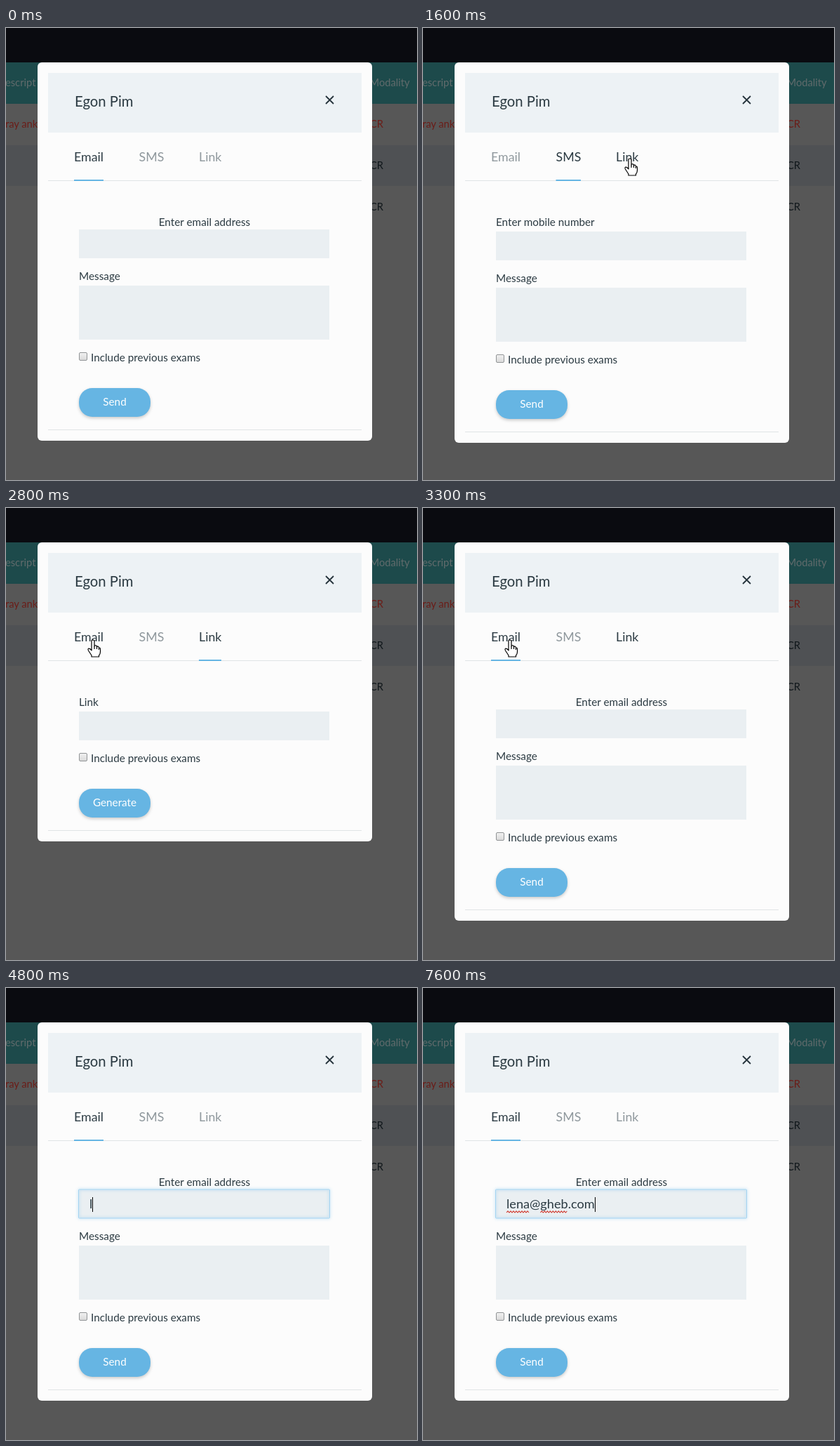
Write an HTML page that moves like this. It is 586 px wide and 644 px high and loops after 8 s.

```html
<!DOCTYPE html>
<html lang="en">
<head>
<meta charset="utf-8">
<title>Share dialog</title>
<style>
  html, body { margin: 0; width: 100%; height: 100%; overflow: hidden; background: #575757; }
  svg { display: block; width: 100%; height: 100%; font: 15.3px Lato, sans-serif; fill: #2b3a42; }
  text { white-space: pre; }
  .field { fill: #eaeff2; }
  .rule { fill: #e0e4e6; }
  .accent { fill: #66b5e3; }
  .button { filter: drop-shadow(0 2px 2px rgba(0, 0, 0, .2)); }
  .focus { fill: none; stroke: #a3d4f1; filter: drop-shadow(0 0 2px #7cc3ee); }
  .squiggle { fill: none; stroke: #d0392e; stroke-width: 1.1; }
  .cursor { fill: #fff; stroke: #000; stroke-width: 1.2; stroke-linejoin: round; }
</style>
</head>
<body>
<svg viewBox="0 0 586 644" xmlns="http://www.w3.org/2000/svg">
  <defs>
    <linearGradient id="box" x2="0" y2="1">
      <stop stop-color="#f1f1f1"/><stop offset="1" stop-color="#d9d9d9"/>
    </linearGradient>
  </defs>

  <rect width="586" height="644" fill="#575757"/>
  <rect width="586" height="49" fill="#0a0b10"/>
  <rect y="49" width="586" height="59" fill="#1d4a4b"/>
  <rect y="167" width="586" height="58" fill="#4f5154"/>
  <g font-size="14.7">
    <g fill="#616b6c"><text x="-1" y="83">escript</text><text x="518.5" y="83">Modality</text></g>
    <g fill="#6b1d18"><text x="-1" y="142">ray ank</text><text x="519" y="142">CR</text></g>
    <g fill="#11181c"><text x="519" y="201">CR</text><text x="519" y="260">CR</text></g>
  </g>

  <rect id="panel" x="45" y="49" width="477" rx="6" fill="#fcfcfc"/>
  <rect x="60" y="64" width="447" height="85" fill="#edf2f5"/>
  <text x="98" y="112" font-size="20.3">Egon Pim</text>
  <path d="M456 97l11 11m0-11l-11 11" stroke="#26343c" stroke-width="1.8"/>
  <g id="tabs" font-size="17.8"></g>
  <rect class="rule" x="60" y="217" width="447" height="1"/>
  <rect id="marker" class="accent" y="216" height="2"/>

  <text id="label" y="282"></text>
  <rect id="input" class="field" x="104" width="357" height="41"/>
  <rect id="focus" class="focus" x="103.5" y="287" width="358" height="41" rx="1"/>
  <g id="message">
    <text x="104" y="359">Message</text>
    <rect class="field" x="104" y="367" width="357" height="77"/>
  </g>
  <g id="footer">
    <rect x="104.5" y="462.5" width="11" height="11" rx="1.5" fill="url(#box)" stroke="#919496"/>
    <text x="121" y="475">Include previous exams</text>
    <rect class="accent button" x="104" y="513" width="102" height="41" rx="19"/>
    <text id="action" x="155" y="538" text-anchor="middle" fill="#fff"></text>
    <rect class="rule" x="60" y="572" width="447" height="1"/>
  </g>

  <text id="typed" x="119" y="314" font-size="18.2"></text>
  <path id="wave1" class="squiggle"/>
  <path id="wave2" class="squiggle"/>
  <rect id="caret" y="298" width="1" height="21" fill="#000"/>

  <path id="arrow" class="cursor" d="M0 0V16.5L4 13L6.6 19L9.2 17.9L6.6 12H12Z"/>
  <g id="hand" class="cursor">
    <path d="M-2 2Q-2 0 0 0Q2 0 2 2V9Q2 7.5 4 7.8Q5.5 8 5.5 10Q6 8.7 7.5 9.2Q8.5 9.6 8.5 11.5Q10.5 10.6 10.5 13V17Q10.5 20 8.5 22V24H-2V22L-6.6 15Q-7.6 13 -6.4 12.3Q-4.5 11.6 -2 15Z"/>
    <path d="M2 9V13M5.5 10V13M8.5 11.5V14" fill="none"/>
  </g>
</svg>
<script>
const LOOP = 8000, STEP = 100;
const ADDRESS = 'lena@gheb.com';
const KEYS = [4800, 5000, 5100, 5200, 5700, 6300, 6500, 6600, 6800, 7100, 7400, 7500, 7600];

const $ = id => document.getElementById(id);
const set = (el, attrs) => { for (const k in attrs) el.setAttribute(k, attrs[k]); };
const show = (el, on) => { el.style.display = on ? '' : 'none'; };

// dark: [time, level] keys for the label colour
const tabs = [
  { name: 'Email', x: 97, w: 42, label: 'Enter email address', action: 'Send', shift: 0,
    dark: [[900, 1], [1200, 0], [2500, 0], [2800, 1]] },
  { name: 'SMS', x: 189.5, w: 35.5, label: 'Enter mobile number', action: 'Send', shift: 3,
    dark: [[500, 0], [700, 1], [1900, 1], [2200, 0]] },
  { name: 'Link', x: 275, w: 32, label: 'Link', action: 'Generate', shift: -113,
    dark: [[1400, 0], [1600, 1], [3300, 1], [3600, 0]] }
];

const path = [
  [200, 291, 418], [700, 206, 187], [1000, 206, 187], [1500, 295, 186],
  [2000, 295, 186], [2700, 124, 188], [3300, 124, 188], [3700, 152, 274]
];

for (const tab of tabs) {
  tab.el = document.createElementNS('http://www.w3.org/2000/svg', 'text');
  tab.el.textContent = tab.name;
  set(tab.el, { x: tab.x, y: 190 });
  $('tabs').append(tab.el);
}

const ease = p => p * p * (3 - 2 * p);

function sample(keys, t, i = 1) {
  if (t <= keys[0][0]) return keys[0][i];
  for (let k = 1; k < keys.length; k++) {
    const a = keys[k - 1], b = keys[k];
    if (t < b[0]) return a[i] + (b[i] - a[i]) * ease((t - a[0]) / (b[0] - a[0]));
  }
  return keys[keys.length - 1][i];
}

function shade(level) {
  const mix = (a, b) => Math.round(a + (b - a) * level);
  return `rgb(${mix(143, 43)},${mix(152, 58)},${mix(157, 66)})`;
}

const widthOf = n => n ? $('typed').getSubStringLength(0, n) : 0;

function squiggle(el, from, to) {
  let d = `M${from} 320`;
  for (let x = from + 2, up = true; x <= to; x += 2, up = !up) d += `L${x} ${up ? 317.8 : 320}`;
  set(el, { d });
}

function drawForm(t) {
  const tab = tabs[t < 900 ? 0 : t < 1900 ? 1 : t < 3300 ? 2 : 0];
  const first = tab === tabs[0];
  for (const one of tabs) one.el.style.fill = shade(sample(one.dark, t));
  set($('marker'), { x: tab.x, width: tab.w });
  set($('panel'), { height: 539 + tab.shift });
  set($('label'), { x: first ? 283 : 104, 'text-anchor': first ? 'middle' : 'start' });
  $('label').textContent = tab.label;
  $('action').textContent = tab.action;
  set($('input'), { y: first ? 287 : 290 });
  set($('message'), { transform: `translate(0 ${tab.shift})` });
  show($('message'), tab.name !== 'Link');
  set($('footer'), { transform: `translate(0 ${tab.shift})` });
  set($('focus'), { opacity: sample([[4000, 0], [4300, 1]], t) });
}

function drawTyping(t) {
  const n = KEYS.filter(k => k <= t).length;
  $('typed').textContent = ADDRESS.slice(0, n);
  set($('caret'), { x: Math.round(119 + widthOf(n)) });
  show($('caret'), t >= 4100 && !(t >= 4500 && t < 4800) && !(t >= 6200 && t < 6300));
  show($('wave1'), n >= 5);
  show($('wave2'), n >= 10);
  if (n >= 5) squiggle($('wave1'), 119, 119 + widthOf(4));
  if (n >= 10) squiggle($('wave2'), 119 + widthOf(5), 119 + widthOf(9));
}

function drawCursor(t) {
  const x = sample(path, t), y = sample(path, t, 2);
  const overTab = y > 170 && y < 217 && tabs.some(b => x >= b.x - 2 && x <= b.x + b.w + 2);
  const overField = t < 900 && (y > 367 || (y > 287 && y < 328));
  const visible = t >= 200 && t < 4000 && !overField;
  set($('hand'), { transform: `translate(${x} ${y})` });
  set($('arrow'), { transform: `translate(${x} ${y})` });
  show($('hand'), visible && overTab);
  show($('arrow'), visible && !overTab);
}

function render(time) {
  const t = Math.floor((time % LOOP) / STEP) * STEP;
  drawForm(t);
  drawTyping(t);
  drawCursor(t);
}

const start = performance.now();
function tick() {
  render(performance.now() - start);
  requestAnimationFrame(tick);
}
tick();
</script>
</body>
</html>
```
